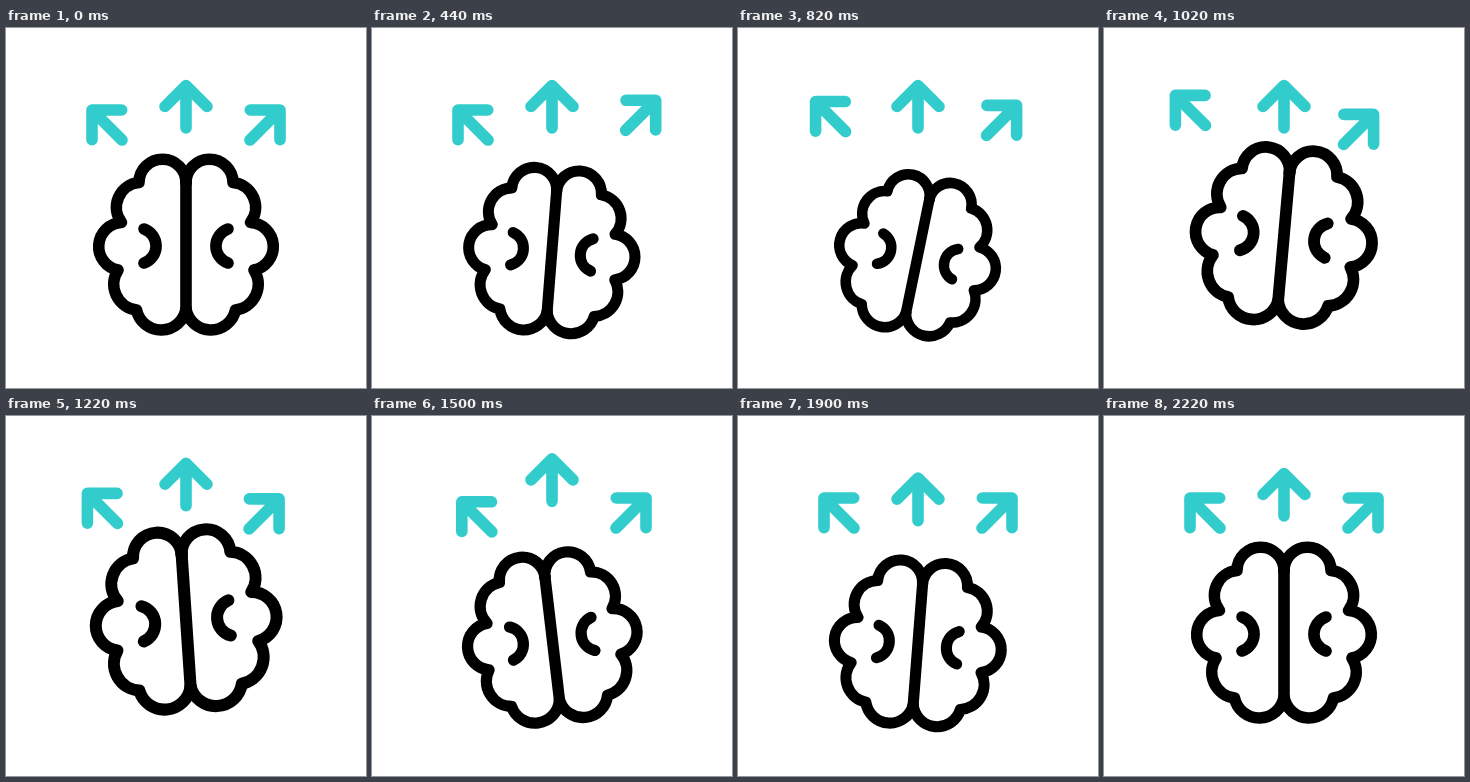
An HTML page for the animation above (2.4 s loop, 360 by 360 pixels).

```html
<!DOCTYPE html>
<html lang="en">
<head>
<meta charset="utf-8">
<title>Brain with arrows</title>
<style>
  html, body { margin: 0; width: 100%; height: 100%; overflow: hidden; background: #fff; }
  svg { display: block; width: 100vw; height: 100vh; }
  .line { fill: none; stroke-width: 11.6; stroke-linecap: round; stroke-linejoin: round; }
  #brain { stroke: #000; transform-origin: 180px 216px; }
  #arrows { stroke: #33cccc; }
</style>
</head>
<body>
<svg viewBox="0 0 360 360">
  <defs>
    <path id="arrow" d="M0 42.5V0M-21 21L0 0L21 21"/>
    <g id="half">
      <path d="M180 155A23.500 23.500 0 0 0 133 154.500A25 25 0 0 0 115.500 194.500
               A24 24 0 0 0 112 242A26 26 0 0 0 130.500 282A25.200 25.200 0 0 0 180 281"/>
      <path d="M138 201A18 18 0 0 1 138 235"/>
    </g>
  </defs>
  <g id="arrows" class="line">
    <g transform="translate(274 82) rotate(45)"><use id="right" href="#arrow"/></g>
    <g transform="translate(86 82) rotate(-45)"><use id="left" href="#arrow"/></g>
    <g transform="translate(180 57.5)"><use id="up" href="#arrow"/></g>
  </g>
  <g id="brain" class="line">
    <use href="#half"/>
    <use href="#half" transform="translate(360 0) scale(-1 1)"/>
    <path d="M180 153V285"/>
  </g>
</svg>
<script>
  const LOOP = 2400, START = 220, END = 2220, STAGGER = 400;
  const SINE = 'cubic-bezier(.37, 0, .63, 1)';

  const shiftY = v => `0px ${v}px`;
  const turn = v => `${v}deg`;

  // Peaks of a swing, each one the previous times the ratio.
  const damped = (peak, ratio, count) => Array.from({ length: count }, (_, i) => peak * ratio ** i);

  // Leaves rest at start, passes each peak at its time, is back at rest by end.
  function swing(id, prop, format, rest, start, end, times, peaks) {
    const steps = [[0, rest], [start, rest], ...times.map((t, i) => [t, peaks[i]]), [end, rest], [LOOP, rest]];
    const frames = steps.map(([t, v]) => ({ offset: t / LOOP, [prop]: format(v), easing: SINE }));
    document.getElementById(id).animate(frames, { duration: LOOP, iterations: Infinity });
  }

  // The arrows shoot out one after another, spring back too far and settle.
  ['right', 'left', 'up'].forEach((id, i) => {
    const start = START + i * STAGGER;
    const reach = id === 'up' ? 18 : 21;
    swing(id, 'translate', shiftY, 0, start, start + 1080, [start + 370, start + 815], damped(-reach, -0.3, 2));
  });

  // The brain crouches, jumps and lands while it rocks from side to side.
  const beats = [720, 1140, 1735];
  swing('brain', 'translate', shiftY, 0, START, END, beats, damped(14.5, -1, 3));
  swing('brain', 'scale', String, 1, START, END, beats, [0.89, 1.042, 0.943]);
  swing('brain', 'rotate', turn, 0, START, END, [750, 1410, 1950], damped(12.2, -0.62, 3));
</script>
</body>
</html>
```
